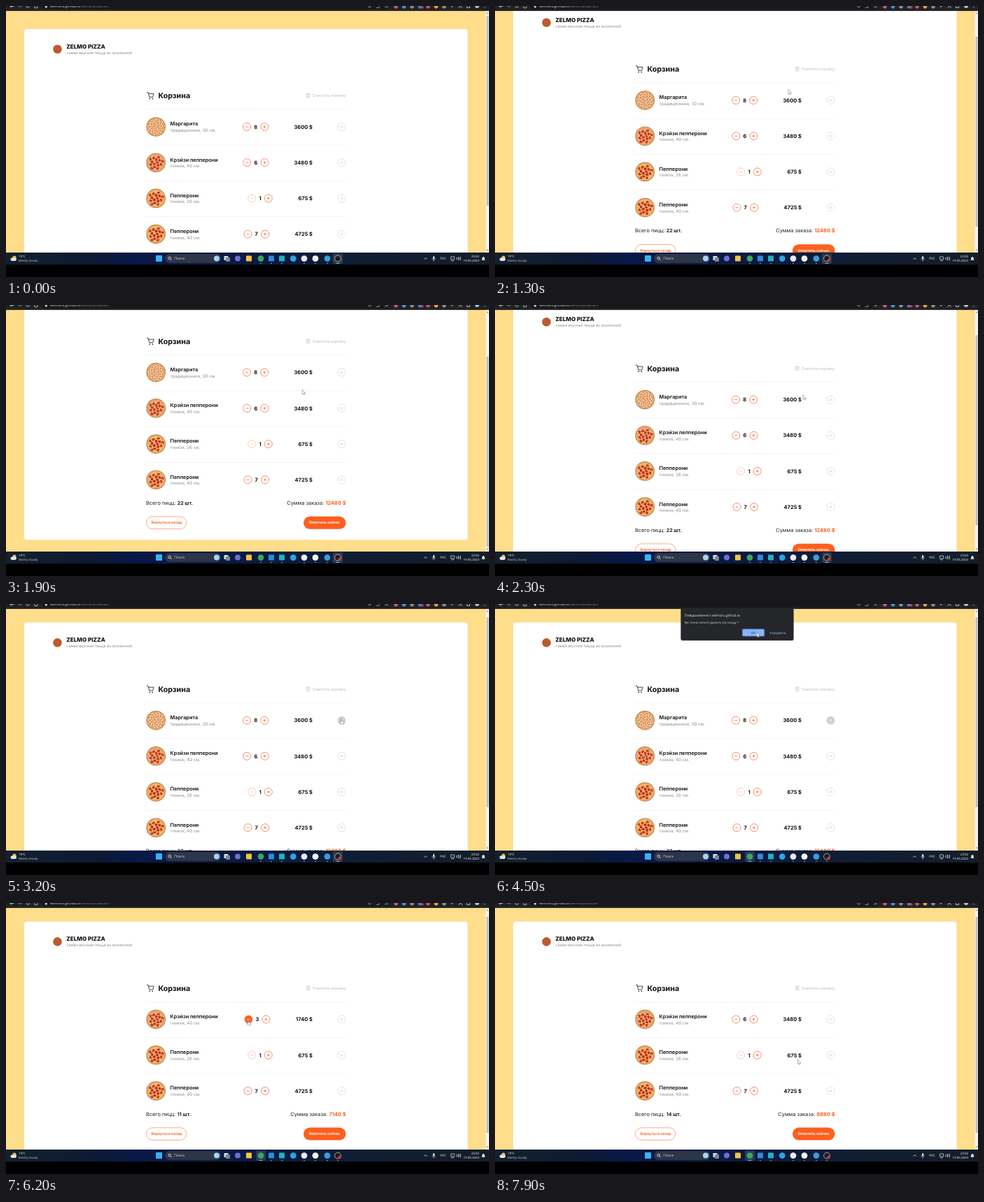
An HTML page that plays this animation: 690x388 px, repeating every 8000 ms.

```html
<!DOCTYPE html>
<html lang="ru">
<head>
<meta charset="utf-8">
<title>Корзина</title>
<style>
  html, body { margin: 0; width: 100%; height: 100%; overflow: hidden; background: #000; }
  svg { display: block; width: 100vw; height: 100vh; }
  text { font-family: Inter, sans-serif; text-rendering: geometricPrecision; white-space: pre; }
  .ui text { font-family: "Open Sans", "Noto Sans", sans-serif; }
</style>
</head>
<body>
<svg viewBox="0 0 690 388" preserveAspectRatio="none">
  <defs>
    <clipPath id="view"><rect y="6.5" width="690" height="346.5"/></clipPath>
    <linearGradient id="bar">
      <stop offset="0" stop-color="#14202c"/><stop offset=".18" stop-color="#0c1a34"/>
      <stop offset=".27" stop-color="#081848"/><stop offset=".55" stop-color="#0b1b40"/>
      <stop offset=".75" stop-color="#101d32"/><stop offset="1" stop-color="#141e2a"/>
    </linearGradient>
  </defs>
  <g clip-path="url(#view)">
    <rect width="690" height="388" fill="#fedd8b"/>
    <g id="page"></g>
    <g id="scrollbar"></g>
  </g>
  <g id="browser" class="ui"></g>
  <g id="taskbar" class="ui"></g>
  <g id="dialog" class="ui"></g>
  <g id="cursor"></g>
</svg>
<script>
const DURATION = 8000, STEP = 100;
const ORANGE = '#fe5f1e', RING = '#f0693c', INK = '#111', GREY = '#8d8d8d';
const ROW_TOP = 173, ROW_PITCH = 51.2;
const REMOVE_AT = 4600, DIALOG_AT = 3500;

const el = id => document.getElementById(id);
const rect = (x, y, w, h, fill, r = 0, extra = '') =>
  `<rect x="${x}" y="${y}" width="${w}" height="${h}" rx="${r}" fill="${fill}" ${extra}/>`;
const circle = (x, y, r, fill, extra = '') =>
  `<circle cx="${x}" cy="${y}" r="${r}" fill="${fill}" ${extra}/>`;
const path = (d, stroke, width = 1, fill = 'none') =>
  `<path d="${d}" stroke="${stroke}" stroke-width="${width}" fill="${fill}" stroke-linejoin="round" stroke-linecap="round"/>`;
const text = (x, y, str, size, fill = INK, weight = 400, anchor = 'start') =>
  `<text x="${x}" y="${y}" font-size="${size}" fill="${fill}" font-weight="${weight}" text-anchor="${anchor}">${str}</text>`;
const at = (x, y, body) => `<g transform="translate(${x} ${y})">${body}</g>`;

// Linear interpolation through [time, ...values] keys.
function track(keys, t) {
  const i = keys.findIndex(k => k[0] > t);
  if (i < 0) return keys.at(-1).slice(1);
  if (i === 0) return keys[0].slice(1);
  const a = keys[i - 1], b = keys[i], p = (t - a[0]) / (b[0] - a[0]);
  return a.slice(1).map((v, j) => v + (b[j + 1] - v) * p);
}
const stepped = (keys, t) => keys.filter(k => k[0] <= t).at(-1)[1];

const SCROLL = [[800, 0], [1100, 30], [1400, 42], [1600, 59.4], [1800, 76.4], [2100, 76.4],
  [2300, 37.5], [2500, 14], [2700, 6.4]];
const CURSOR = [[100, 462, 310], [200, 419, 120], [1800, 419, 120], [2300, 440, 129], [2900, 436, 150],
  [3100, 472, 164], [3200, 479, 165], [3400, 479, 165], [4100, 374, 41], [4600, 374, 41],
  [5200, 346, 168], [6200, 346, 168], [6600, 370, 166], [7500, 370, 166], [7900, 432.5, 224.5]];
const CURSOR_KIND = [[0, 'arrow'], [1500, 'beam'], [1800, 'arrow'], [3100, 'hand'], [3500, 'arrow'],
  [5200, 'hand'], [6300, 'arrow'], [6500, 'hand'], [7600, 'arrow']];
const CRAZY_COUNT = [[0, 6], [5800, 5], [6000, 4], [6200, 3], [6800, 4], [7100, 5], [7300, 6]];

// Centre of the counter and distance to its buttons for each quantity.
const COUNTER = { 1: [363, 11.8], 3: [359, 12.5], 4: [358, 12.7], 5: [357.4, 12.5],
  6: [357, 12.6], 7: [357.8, 12.3], 8: [356.7, 12.6] };

// Toppings laid out on a sunflower spiral.
function spiral(n, reach, size, fill, turn = 0) {
  return Array.from({ length: n }, (_, i) => {
    const r = reach * Math.sqrt((i + .5) / n), a = i * 2.39996 + turn;
    return circle((r * Math.cos(a)).toFixed(2), (r * Math.sin(a)).toFixed(2), size, fill);
  }).join('');
}
const crust = cheese => circle(0, 0, 13.8, '#b9743c') + circle(0, 0, 13.1, '#dfa766') + circle(0, 0, 11.6, cheese);
const PIZZA = {
  margarita: crust('#df9d68') + spiral(46, 11.3, 1.15, '#f5d8ae') + spiral(22, 10.6, .75, '#c4553a', 1),
  crazy: crust('#eaa56c') + spiral(15, 10.1, 2, '#c6381f') + spiral(24, 10.8, .75, '#f7dcbc', 1),
  pepperoni: crust('#efb468') + spiral(15, 10.1, 1.95, '#bd261a') + spiral(14, 10.5, .7, '#f9d89a', 1),
};

function roundButton(x, plus, { hover = false, disabled = false } = {}) {
  const sign = 'M-1.7 0H1.7' + (plus ? 'M0 -1.7V1.7' : '');
  return at(x, 0, `<g opacity="${disabled ? .45 : 1}">` +
    circle(0, 0, 5.5, hover ? ORANGE : '#fff', `stroke="${RING}" stroke-width=".75"`) +
    path(sign, hover ? '#fff' : RING, .8) + '</g>');
}

function row(item, y, hover) {
  const [centre, gap] = COUNTER[item.count], off = hover === 'remove';
  return at(0, y,
    rect(200, -25.3, 285.5, .7, '#efefef') +
    at(214.2, 0, PIZZA[item.art]) +
    text(234.5, -1.6, item.name, 7.3, INK, 600) +
    text(234.5, 7, item.kind, 6.1, GREY) +
    roundButton(centre - gap, false, { hover: hover === 'minus', disabled: item.count === 1 }) +
    text(centre, 2.7, item.count, 7.5, INK, 700, 'middle') +
    roundButton(centre + gap, true, { hover: hover === 'plus' }) +
    text(438, 2.7, item.count * item.price + ' $', 7.5, INK, 700, 'end') +
    circle(479.5, 0, 5.5, off ? '#d0d0d0' : '#fff', `stroke="${off ? '#d0d0d0' : '#dcdcdc'}" stroke-width=".8"`) +
    path('M478.4 -1.1l2.2 2.2m0 -2.2l-2.2 2.2', off ? '#fff' : '#c4c4c4', .8));
}

function cart(t) {
  const items = [
    { name: 'Маргарита', kind: 'традиционное, 30 см.', art: 'margarita', count: 8, price: 450 },
    { name: 'Крэйзи пепперони', kind: 'тонкое, 40 см.', art: 'crazy', count: stepped(CRAZY_COUNT, t), price: 580 },
    { name: 'Пепперони', kind: 'тонкое, 26 см.', art: 'pepperoni', count: 1, price: 675 },
    { name: 'Пепперони', kind: 'тонкое, 40 см.', art: 'pepperoni', count: 7, price: 675 },
  ];
  return t < REMOVE_AT ? items : items.slice(1);
}

function page(t) {
  const items = cart(t);
  const hover = stepped([[0, ''], [3100, 'remove'], [REMOVE_AT, ''], [5200, 'minus'],
    [6300, ''], [6500, 'plus'], [7600, '']], t);
  const count = items.reduce((n, i) => n + i.count, 0);
  const sum = items.reduce((n, i) => n + i.count * i.price, 0);
  const last = ROW_TOP + (items.length - 1) * ROW_PITCH;
  return rect(26, 33, 633.5, last + 53, '#fff', 4) +
    circle(73.5, 61.8, 6.3, '#bd5a30') +
    text(86.3, 60.8, 'ZELMO PIZZA', 8.1, INK, 800) +
    text(86.3, 68.6, 'самая вкусная пицца во вселенной', 5.4, GREY) +
    path('M201.3 123.8h1.9l1.6 6.6h4.9l1.4-4.8h-7.5', '#333', .9) +
    circle(205.3, 132.7, .9, '#333') + circle(209.3, 132.7, .9, '#333') +
    text(217.5, 132.3, 'Корзина', 10.7, INK, 700) +
    path('M429 126.3h5.4M430.6 126.2v-1h2.2v1M429.6 126.4v4.8h4.2v-4.8M431 128v1.8M432.4 128v1.8', '#bcbcbc', .55) +
    text(485.5, 130.4, 'Очистить корзину', 5.4, '#b9b9b9', 400, 'end') +
    items.map((item, i) => row(item, ROW_TOP + i * ROW_PITCH, i === 0 ? hover : '')).join('') +
    at(0, last + 33,
      text(200, 2.6, `Всего пицц: <tspan font-weight="700" font-size="7.1">${count} шт.</tspan>`, 7.4, '#222') +
      text(485.5, 2.6, `Сумма заказа: <tspan font-weight="700" fill="${ORANGE}">${sum} $</tspan>`, 7.4, '#222', 400, 'end') +
      rect(200.4, 19.8, 57.4, 17.6, '#fff', 8.8, `stroke="${ORANGE}" stroke-opacity=".75" stroke-width=".7"`) +
      text(229.5, 30.3, 'Вернуться назад', 5.2, ORANGE, 600, 'middle') +
      rect(425, 19.6, 60.5, 18, ORANGE, 9) +
      text(455.2, 30.3, 'Оплатить сейчас', 5.2, '#fff', 700, 'middle'));
}

function scrollbar(t, scroll) {
  const trackLength = 332, content = t < REMOVE_AT ? 422.5 : 422.5 - ROW_PITCH;
  return rect(685.5, 6.5, 4.5, 346.5, '#f3f3f3') +
    rect(686.5, 14 + scroll * trackLength / content, 3, trackLength * 346 / content, '#bdbdbd') +
    path('M686.8 11l1.1-1.4 1.1 1.4zM686.8 348.8l1.1 1.4 1.1-1.4z', '#777', .2, '#777');
}

function browser() {
  const icons = ['#c75a86', '#4f8fd0', '#8b8f94', '#5b79c9', '#b9577c', '#f2a03a', '#8b8f94'];
  return rect(0, 0, 690, 7.1, '#202225') + rect(50, -6, 498, 10.5, '#16181b', 5) +
    path('M11 .5H6m2.2 2L6 .5l2.2-2', '#ddd', .8) + path('M17 .5h5m-2.2 2L22 .5l-2.2-2', '#777', .8) +
    path('M28.8 0a2.3 2.3 0 0 0 4.6 0M40.8 0v2.7h4V0', '#ccc', .8) + rect(55.8, -1, 3, 3.4, '#ccc', .4) +
    text(63, 2.2, 'velmoru.github.io<tspan fill="#8b8f94">/zelmo-pizza/cart</tspan>', 5.2, '#e8eaed') +
    path('M517.5 0a2 2 0 0 0 4 0M529 2.4h4V0M541 2.2l2-1.4 2 1.4V0', '#bbb', .7) +
    icons.map((c, i) => circle(557 + i * 11.5, .7, 2.8, c)).join('') + circle(595, 2, 1.7, '#d5362f') +
    path('M635 -1l2 2.6 2-2.6M647 2.5l2.2-3 2.2 3M658.5 0v2.5h4V0', '#ddd', .8) +
    circle(673, 0, 3, '#b6c3d0') + circle(684, 1.8, .6, '#ddd');
}

function taskbar(t) {
  const apps = [[347, '#f4c342', 1], [364, '#3fa65a'], [379, '#2e8bd6', 1], [394, '#1fb2c4', 1],
    [410.3, '#2ca5e0'], [426, '#e9eafd'], [442, '#f5f5f5'], [459, '#3b9ddb']];
  const underline = (x, active) =>
    rect(x - (active ? 2.6 : 1.1), 368.4, active ? 5.2 : 2.2, 1, active ? '#69b7ee' : '#87909c', .5);
  const activeX = t >= DIALOG_AT ? 364 : 474;
  return rect(0, 353, 690, 35, '#000') + rect(0, 353, 690, 17.3, 'url(#bar)') + at(0, -.4,
    circle(12, 360.5, 2.6, '#f5b83d') + rect(6.5, 361, 8.5, 4.3, '#dbe6f2', 2.1) +
    text(18.2, 360.6, '19°C', 4.4, '#fff') + text(17.8, 366.3, 'Mostly cloudy', 4.3, '#c8ced6') +
    rect(214, 357.4, 9, 9, '#38b3ee', .8) +
    rect(227.5, 356, 79.5, 12.2, '#2c3648', 6, 'stroke="#3e485a" stroke-width=".4"') +
    circle(233.7, 361.4, 1.8, 'none', 'stroke="#eee" stroke-width=".8"') + path('M235.1 362.9l1.4 1.4', '#eee', .8) +
    text(240.2, 363.7, 'Поиск', 5.1, '#d3d8df') + circle(301, 362, 4, '#a9d3ef') +
    rect(311.5, 358.5, 6, 6, '#d9dde2', .5) + rect(314, 360.5, 6, 6, '#7d868f', .5) +
    circle(331, 362, 4, '#6d6fce') +
    rect(activeX - 7, 354.6, 14, 14.8, '#ffffff', 1.5, 'opacity=".13"') +
    apps.map(([x, c, square]) => square ? rect(x - 4, 358, 8, 8, c, .8) : circle(x, 362, 4.4, c)).join('') +
    circle(474, 362, 4.4, '#1b1c20', 'stroke="#c9cbd0" stroke-width=".8"') +
    (t >= 100 ? circle(476.6, 364.4, 2.2, '#e5302c') : '') +
    [364, 379, 394, 426, 442, 459, 474].map(x => underline(x, x === activeX)).join('') +
    path('M597.8 362.8l1.7-1.7 1.7 1.7', '#eee', .8) +
    rect(610, 358.6, 2.2, 4.4, '#eee', 1.1) + path('M608.8 362a2.3 2.3 0 0 0 4.6 0M611.1 364.4v1.3', '#eee', .5) +
    text(620.3, 363.7, 'РУС', 4.6, '#fff') +
    rect(635.4, 359.4, 5.2, 4, 'none', .4, 'stroke="#eee" stroke-width=".7"') + path('M636.5 365.2h3', '#eee', .7) +
    path('M644 361h1l1.5-1.5v5L645 363h-1zM648 360.5v3M649.5 359.6v4.8', '#eee', .6) +
    text(676, 360.6, '23:02', 4.4, '#fff', 400, 'end') + text(676, 366.3, '19.05.2023', 4.4, '#fff', 400, 'end') +
    path('M680 364h4l-.6-1v-1.6a1.4 1.4 0 0 0-2.8 0v1.6z', '#eee', .6, '#eee'));
}

function dialog() {
  return rect(265, 5.5, 162, 47.5, '#000', 3, 'opacity=".25"') +
    rect(265.5, 6, 161, 46, '#25262a', 2.5) +
    text(271, 17.6, 'Повідомлення з velmoru.github.io', 4.85, '#eceef1') +
    text(271, 27.8, 'Вы точно хотите удалить эту пиццу ?', 4.3, '#dfe1e5') +
    rect(352.8, 35.3, 32.6, 11.4, '#3d5f9c', 2) + rect(353.8, 36.2, 30.6, 9.6, '#8ab4f8', 1.4) +
    text(369, 42.6, 'ОК', 4.6, '#34507f', 600, 'middle') +
    text(404, 42.6, 'Скасувати', 4.4, '#8ab4f8', 600, 'middle');
}

const POINTERS = {
  arrow: path('M0 0V6.2L1.4 4.9 2.4 7.1 3.4 6.6 2.4 4.5H4.3Z', '#555', .45, '#fff'),
  beam: path('M-.9 -3.2H.9M0 -3.2V3.2M-.9 3.2H.9', '#777', .45),
  hand: path('M-.7 0Q0 -.8 .6 0V2.6L3.4 3.4Q4 3.7 3.8 4.8L3.2 7H-.4L-2.4 4.3Q-2.2 3.3-.7 4.3Z', '#444', .45, '#fff'),
};

function draw(t) {
  const [scroll] = track(SCROLL, t);
  el('page').setAttribute('transform', `translate(0 ${-scroll})`);
  el('page').innerHTML = page(t);
  el('scrollbar').innerHTML = scrollbar(t, scroll);
  el('taskbar').innerHTML = taskbar(t);
  el('dialog').innerHTML = t >= DIALOG_AT && t < REMOVE_AT ? dialog() : '';
  el('cursor').innerHTML = t < 100 ? '' : at(...track(CURSOR, t), POINTERS[stepped(CURSOR_KIND, t)]);
}

el('browser').innerHTML = browser();
const start = performance.now();
let shown = -1;
function tick() {
  const t = Math.floor(((performance.now() - start) % DURATION) / STEP) * STEP;
  if (t !== shown) draw(shown = t);
  requestAnimationFrame(tick);
}
tick();
</script>
</body>
</html>
```
